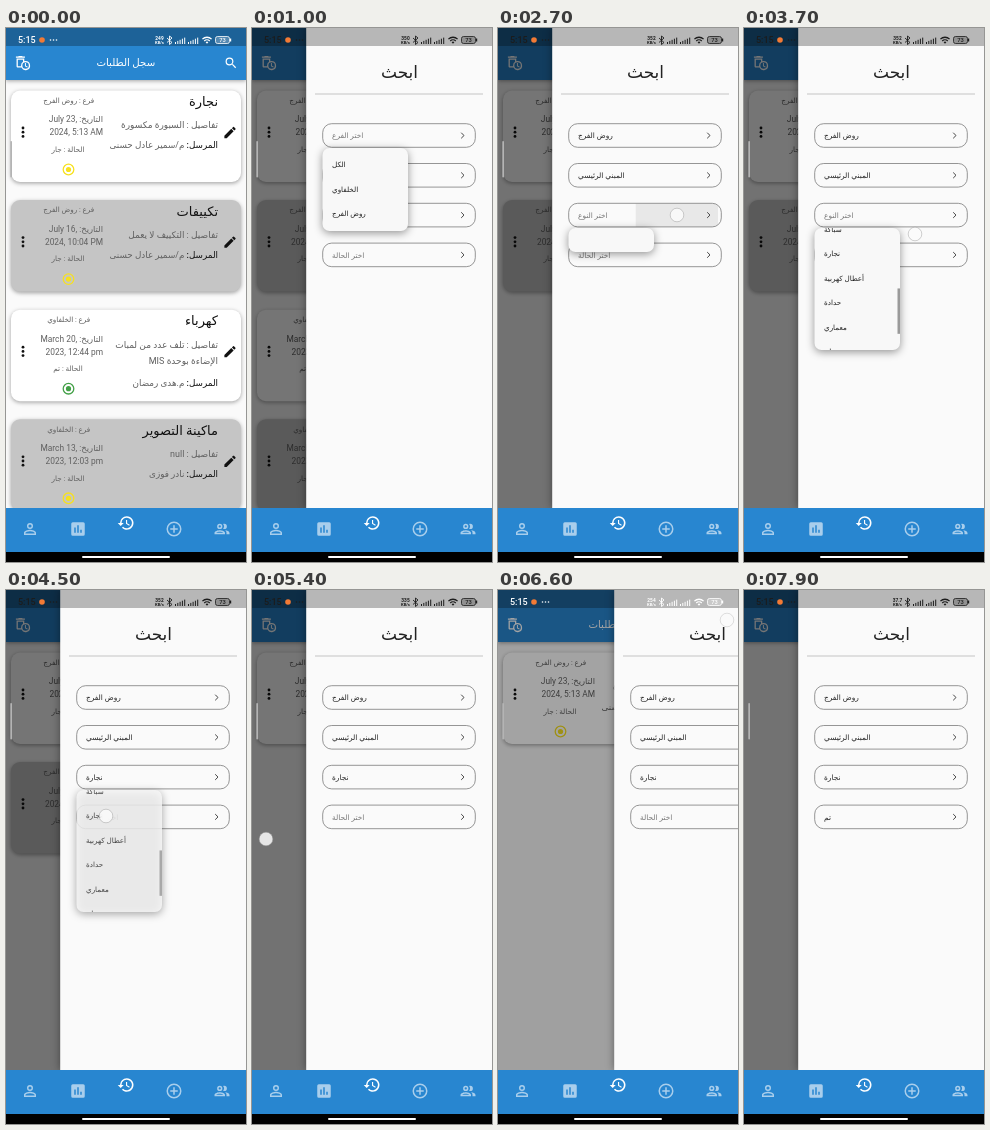
An HTML page with a canvas for the animation above (8 s loop, 240 px wide and 534 px high).

```html
<!DOCTYPE html>
<html lang="ar">
<head>
<meta charset="utf-8">
<style>
html, body { margin: 0; width: 100%; height: 100%; overflow: hidden; background: #fafafa; }
canvas { display: block; width: 240px; height: 534px; }
</style>
</head>
<body>
<canvas id="stage"></canvas>
<script>
const canvas = document.getElementById('stage'), ctx = canvas.getContext('2d');
const dpr = window.devicePixelRatio || 1;
canvas.width = 240 * dpr;
canvas.height = 534 * dpr;

const LOOP = 8000, BLUE = '#2886d0', PAPER = '#fafafa', ROW = 24.5;
const icons = {
  search: 'M15.5 14h-.79l-.28-.27A6.47 6.47 0 0 0 16 9.5 6.5 6.5 0 1 0 9.5 16c1.61 0 3.09-.59 4.23-1.57l.27.28v.79l5 4.99L20.49 19zm-6 0a4.5 4.5 0 1 1 0-9 4.5 4.5 0 0 1 0 9z',
  edit: 'M3 17.25V21h3.75L17.81 9.94l-3.75-3.75zM20.71 7.04a1 1 0 0 0 0-1.41l-2.34-2.34a1 1 0 0 0-1.41 0l-1.83 1.83 3.75 3.75z',
  clear: 'M15 2h-3.5l-1-1h-5l-1 1H1v2h14zM16 9c-.7 0-1.37.1-2 .29V5H2v12c0 1.1.9 2 2 2h5.68A7 7 0 1 0 16 9zm-7 7c0 .34.03.67.08 1H4V7h8v3.25A7 7 0 0 0 9 16zm7 5a5 5 0 1 1 0-10 5 5 0 0 1 0 10zM16.5 12H15v5l3.6 2.1.8-1.2-2.9-1.7z',
  person: 'M12 5.9a2.1 2.1 0 1 1 0 4.2 2.1 2.1 0 0 1 0-4.2m0 9c2.97 0 6.1 1.46 6.1 2.1v1.1H5.9V17c0-.64 3.13-2.1 6.1-2.1M12 4a4 4 0 1 0 0 8 4 4 0 0 0 0-8zm0 9c-2.67 0-8 1.34-8 4v3h16v-3c0-2.66-5.33-4-8-4z',
  chart: 'M19 3H5a2 2 0 0 0-2 2v14a2 2 0 0 0 2 2h14a2 2 0 0 0 2-2V5a2 2 0 0 0-2-2zM9 17H7v-7h2zm4 0h-2V7h2zm4 0h-2v-4h2z',
  history: 'M13 3a9 9 0 0 0-9 9H1l3.89 3.89.07.14L9 12H6a7 7 0 1 1 2.06 4.94l-1.42 1.42A9 9 0 1 0 13 3zm-1 5v5l4.28 2.54.72-1.21-3.5-2.08V8z',
  add: 'M13 7h-2v4H7v2h4v4h2v-4h4v-2h-4zM12 2a10 10 0 1 0 0 20 10 10 0 0 0 0-20zm0 18a8 8 0 1 1 0-16 8 8 0 0 1 0 16z',
  people: 'M9 13.75c-2.34 0-7 1.17-7 3.5V19h14v-1.75c0-2.33-4.66-3.5-7-3.5zM4.34 17c.84-.58 2.87-1.25 4.66-1.25s3.82.67 4.66 1.25zM9 12a3.5 3.5 0 1 0 0-7 3.5 3.5 0 0 0 0 7zm0-5a1.5 1.5 0 1 1 0 3 1.5 1.5 0 0 1 0-3zm7.04 6.81c1.16.84 1.96 1.96 1.96 3.44V19h4v-1.75c0-2.02-3.5-3.17-5.96-3.44zM15 12a3.5 3.5 0 1 0 0-7c-.54 0-1.04.13-1.5.35a5 5 0 0 1 0 6.3c.46.22.96.35 1.5.35z',
  wifi: 'M1 9a16 16 0 0 1 22 0l-2 2a13 13 0 0 0-18 0zm4 4a10 10 0 0 1 14 0l-2 2a7 7 0 0 0-10 0zm4 4a4 4 0 0 1 6 0l-3 3z'
};
for (const name in icons) icons[name] = new Path2D(icons[name]);

const cards = [
  { title: 'نجارة', branch: 'روض الفرج', date: ['July 23,', '2024, 5:13 AM'], lines: ['السبورة مكسورة'], sender: 'م/سمير عادل حسنى' },
  { title: 'تكييفات', branch: 'روض الفرج', date: ['July 16,', '2024, 10:04 PM'], lines: ['التكييف لا يعمل'], sender: 'م/سمير عادل حسنى' },
  { title: 'كهرباء', branch: 'الخلفاوي', date: ['March 20,', '2023, 12:44 pm'], lines: ['تلف عدد من لمبات', 'الإضاءة بوحدة MIS'], sender: 'م.هدى رمضان', done: true },
  { title: 'ماكينة التصوير', branch: 'الخلفاوي', date: ['March 13,', '2023, 12:03 pm'], lines: ['null'], sender: 'نادر فوزى' }
];
const fields = [
  { hint: 'اختر الفرع', value: 'روض الفرج', open: 740, close: 1400, items: ['الكل', 'الخلفاوي', 'روض الفرج'] },
  { hint: 'اختر المبني', value: 'المبني الرئيسي', open: 1760, close: 2200, items: ['الكل', 'المبني الرئيسي', 'المبني الفرعي'] },
  { hint: 'اختر النوع', value: 'نجارة', open: 2650, close: 4480, items: ['الكل', 'تكييفات', 'كهرباء', 'ماكينة التصوير', 'شبكات', 'أجهزة', 'سباكة', 'نجارة', 'أعطال كهربية', 'حدادة', 'معماري', 'دهان', 'أخرى'] },
  { hint: 'اختر الحالة', value: 'تم', open: 7040, close: 7520, items: ['الكل', 'جار', 'تم'] }
];
// time, x, y
const taps = [[120, 225, 34], [680, 150, 108], [1310, 112, 185], [1680, 150, 148], [2110, 112, 201],
  [2620, 179, 187], [4390, 100, 226], [5330, 14, 249], [6450, 229, 30], [6960, 150, 227], [7430, 100, 305]];
const speeds = [[0, '249'], [900, '350'], [1900, '352'], [4600, '335'], [5700, '254'], [7200, '37.7']];

const clamp = v => Math.max(0, Math.min(1, v));
const ramp = (t, from, to) => clamp((t - from) / (to - from));
const ease = p => p * p * (3 - 2 * p);

function text(s, x, y, size, color, align = 'center', weight = 400) {
  ctx.font = `${weight} ${size}px Roboto, "DejaVu Sans", sans-serif`;
  ctx.direction = /^[\dA-Z]/.test(s) ? 'ltr' : 'rtl';
  ctx.textAlign = align;
  ctx.fillStyle = color;
  ctx.fillText(s, x, y + size * .32);
  return ctx.measureText(s).width;
}
function rect(x, y, w, h, color) {
  ctx.fillStyle = color;
  ctx.fillRect(x, y, w, h);
}
function round(x, y, w, h, r) {
  ctx.beginPath();
  ctx.roundRect(x, y, w, h, r);
}
function disc(x, y, r, color) {
  ctx.beginPath();
  ctx.arc(x, y, r, 0, 7);
  ctx.fillStyle = color;
  ctx.fill();
}
function line(points, color, width = 1) {
  ctx.beginPath();
  points.forEach(p => ctx.lineTo(...p));
  ctx.strokeStyle = color;
  ctx.lineWidth = width;
  ctx.stroke();
}
function icon(name, x, y, size, color) {
  ctx.save();
  ctx.translate(x - size / 2, y - size / 2);
  ctx.scale(size / 24, size / 24);
  ctx.fillStyle = color;
  ctx.fill(icons[name], 'evenodd');
  ctx.restore();
}
function shadow(color, blur, dy) {
  ctx.shadowColor = color;
  ctx.shadowBlur = blur * dpr;
  ctx.shadowOffsetY = dy * dpr;
}

function drawCard(card, i) {
  const y = 62.5 + i * 109.6, grey = '#606060';
  ctx.save();
  shadow('rgba(0,0,0,.36)', 4, 1.3);
  round(5, y, 230, 91.5, 9);
  ctx.fillStyle = i % 2 ? '#c5c5c5' : '#fff';
  ctx.fill();
  ctx.restore();

  text(card.title, 212, y + 11.3, 13, '#111', 'right');
  card.lines.forEach((s, n) => text(n ? s : 'تفاصيل : ' + s, 212, y + 35 + n * 16.5, 9, grey, 'right'));
  const senderY = y + (card.lines.length > 1 ? 73 : 55);
  const label = text('المرسل: ', 212, senderY, 8.8, '#111', 'right', 500);
  text(card.sender, 212 - label, senderY, 8.8, grey, 'right');

  text('فرع : ' + card.branch, 62.7, y + 10, 7.2, grey);
  text(`التاريخ: ${card.date[0]}\u200e`, 97, y + 29.2, 8.4, grey, 'right');
  text(card.date[1], 97, y + 42.2, 8.4, grey, 'right');
  text('الحالة : ' + (card.done ? 'تم' : 'جار'), 62, y + 59, 7.3, grey);

  const color = card.done ? '#43a047' : '#f7e11f';
  ctx.beginPath();
  ctx.arc(62.5, y + 79, 5.3, 0, 7);
  ctx.strokeStyle = color;
  ctx.lineWidth = 1.3;
  ctx.stroke();
  disc(62.5, y + 79, 2.6, color);
  for (let k = -1; k < 2; k++) disc(17, y + 41.7 + k * 4.2, 1.4, '#111');
  icon('edit', 224, y + 42, 15, '#111');
}

function drawPage(t) {
  rect(0, 0, 240, 480, PAPER);
  const count = t < 1500 ? 4 : t < 4650 ? 2 : t < 7620 ? 1 : 0;
  cards.slice(0, count).forEach(drawCard);
  ctx.save();
  shadow('rgba(0,0,0,.35)', 4, 1);
  rect(0, 0, 240, 52, BLUE);
  ctx.restore();
  icon('clear', 17, 35, 15.5, '#fff');
  text('سجل الطلبات', 119.8, 34.3, 10.2, '#fff');
  icon('search', 225, 35, 14.5, '#fff');
}

function drawField(field, i, t) {
  const y = 95.7 + i * 39.8, chosen = t >= field.close;
  ctx.save();
  round(70.7, y, 152.6, 23.6, 9);
  ctx.clip();
  const tap = taps.find(([at, x, ty]) => x > 130 && x < 200 && Math.abs(ty - y - 12) < 6 && t >= at && t < at + 230);
  if (tap) {
    const spread = (t - tap[0]) * .51;
    const left = Math.max(71, tap[1] - spread), right = Math.min(220, tap[1] + spread);
    rect(left, y, right - left, 24, 'rgba(0,0,0,.07)');
  }
  ctx.restore();
  round(70.7, y, 152.6, 23.6, 9);
  ctx.strokeStyle = '#7c7c7c';
  ctx.lineWidth = .8;
  ctx.stroke();
  text(chosen ? field.value : field.hint, 80, y + 12.3, 7.4, chosen ? '#222' : '#777', 'left');
  line([[209.2, y + 9], [212, y + 11.8], [209.2, y + 14.6]], '#444', 1);
}

function drawPopup(field, i, t) {
  if (t < field.open || t > field.close + 120) return;
  const grow = ramp(t, field.open, field.open + 260);
  const content = field.items.length * ROW + 9.5, full = Math.min(122, content);
  const top = 120 + i * 40, h = full * grow;
  const scroll = content > full ? 162.5 * ease(ramp(t, 3120, 3690)) : 0;
  ctx.save();
  ctx.globalAlpha = 1 - ramp(t, field.close, field.close + 120);
  ctx.save();
  shadow('rgba(0,0,0,.42)', 8, 2);
  round(70.5, top, 85.5, h, 7);
  ctx.fillStyle = '#f8f8f8';
  ctx.fill();
  ctx.restore();
  round(70.5, top, 85.5, h, 7);
  ctx.clip();
  const shown = ctx.globalAlpha;
  ctx.globalAlpha = shown * ramp(grow, .25, .8);
  field.items.forEach((s, n) => text(s, 80, top + 16.8 + n * ROW - scroll, 7.2, '#222', 'left'));
  if (content > full && t > 3100) {
    ctx.globalAlpha = shown;
    rect(153.5, top + scroll * full / content, 2.5, full * full / content, '#9a9a9a');
  }
  ctx.restore();
}

function drawDrawer(t, open) {
  if (!open) return;
  rect(0, 0, 240, 480, `rgba(0,0,0,${.54 * open})`);
  ctx.save();
  ctx.translate(186 * (1 - open), 0);
  ctx.save();
  shadow('rgba(0,0,0,.4)', 8, 0);
  rect(54.2, 0, 186, 480, PAPER);
  ctx.restore();
  text('ابحث', 147.5, 44.7, 17, '#222');
  rect(63, 65.5, 168, 1, '#c6c6c6');
  fields.forEach((f, i) => drawField(f, i, t));
  fields.forEach((f, i) => drawPopup(f, i, t));
  ctx.restore();
}

function drawStatus(t, open) {
  const ink = open > .7 ? '#1c1c1c' : '#fff';
  rect(0, 0, 240, 18, 'rgba(0,0,0,.27)');
  text('5:15', 12, 12, 9, ink, 'left', 500);
  disc(36, 12, 2.8, '#f27a35');
  for (let k = 0; k < 3; k++) disc(44.5 + k * 3, 12, .8, ink);
  const speed = speeds.filter(s => s[0] <= t).pop()[1];
  text(speed, 153.5, 10, 4.8, ink, 'center', 700);
  text('KB/s', 153.5, 14.3, 4.2, ink, 'center', 700);
  line([[161, 10], [166, 14.5], [163.5, 16.5], [163.5, 8], [166, 10], [161, 14.5]], ink, .9);
  for (const x of [169, 182])
    for (let k = 0; k < 5; k++) rect(x + k * 2.3, 14 - k * 1.1, 1, 2 + k * 1.1, ink);
  icon('wifi', 201, 12, 11, ink);
  round(209.5, 8.5, 14, 7, 2);
  ctx.save();
  ctx.globalAlpha = .25;
  ctx.fillStyle = ink;
  ctx.fill();
  ctx.restore();
  ctx.strokeStyle = ink;
  ctx.lineWidth = .8;
  ctx.stroke();
  rect(224, 10.5, 1.2, 3, ink);
  text('73', 216.5, 12.1, 5.8, ink, 'center', 500);
}

function drawNav() {
  rect(0, 480, 240, 44, BLUE);
  ['person', 'chart', 'history', 'add', 'people'].forEach((name, i) =>
    icon(name, 24 + i * 48, i === 2 ? 495 : 501, 18, i === 2 ? '#fff' : 'rgba(255,255,255,.6)'));
  rect(0, 524, 240, 10, '#000');
  round(76, 528, 88, 2, 1);
  ctx.fillStyle = '#fff';
  ctx.fill();
}

function touch(x, y, alpha) {
  ctx.save();
  ctx.globalAlpha = alpha;
  disc(x, y, 6.8, 'rgba(250,250,250,.85)');
  ctx.strokeStyle = 'rgba(150,150,150,.55)';
  ctx.lineWidth = .8;
  ctx.stroke();
  ctx.restore();
}

function drawTouches(t) {
  for (const [at, x, y] of taps)
    if (t >= at && t < at + 190) touch(x, y, 1 - ramp(t, at + 130, at + 190));
  if (t > 3080 && t < 3760) {
    const p = ease(ramp(t, 3120, 3690));
    touch(145 + 26 * p, 305 - 99 * p, 1 - ramp(t, 3705, 3760));
  }
}

function frame() {
  const t = performance.now() % LOOP;
  const open = t < 5500 ? ramp(t, 260, 510) : t < 6400 ? 1 - ramp(t, 5500, 5750) : ramp(t, 6437, 6683);
  ctx.setTransform(dpr, 0, 0, dpr, 0, 0);
  drawPage(t);
  drawDrawer(t, open);
  drawStatus(t, open);
  drawNav();
  round(4.3, 113, 1.7, 36.5, .8);
  ctx.fillStyle = '#b4b4b4';
  ctx.fill();
  drawTouches(t);
  requestAnimationFrame(frame);
}
frame();
</script>
</body>
</html>
```
